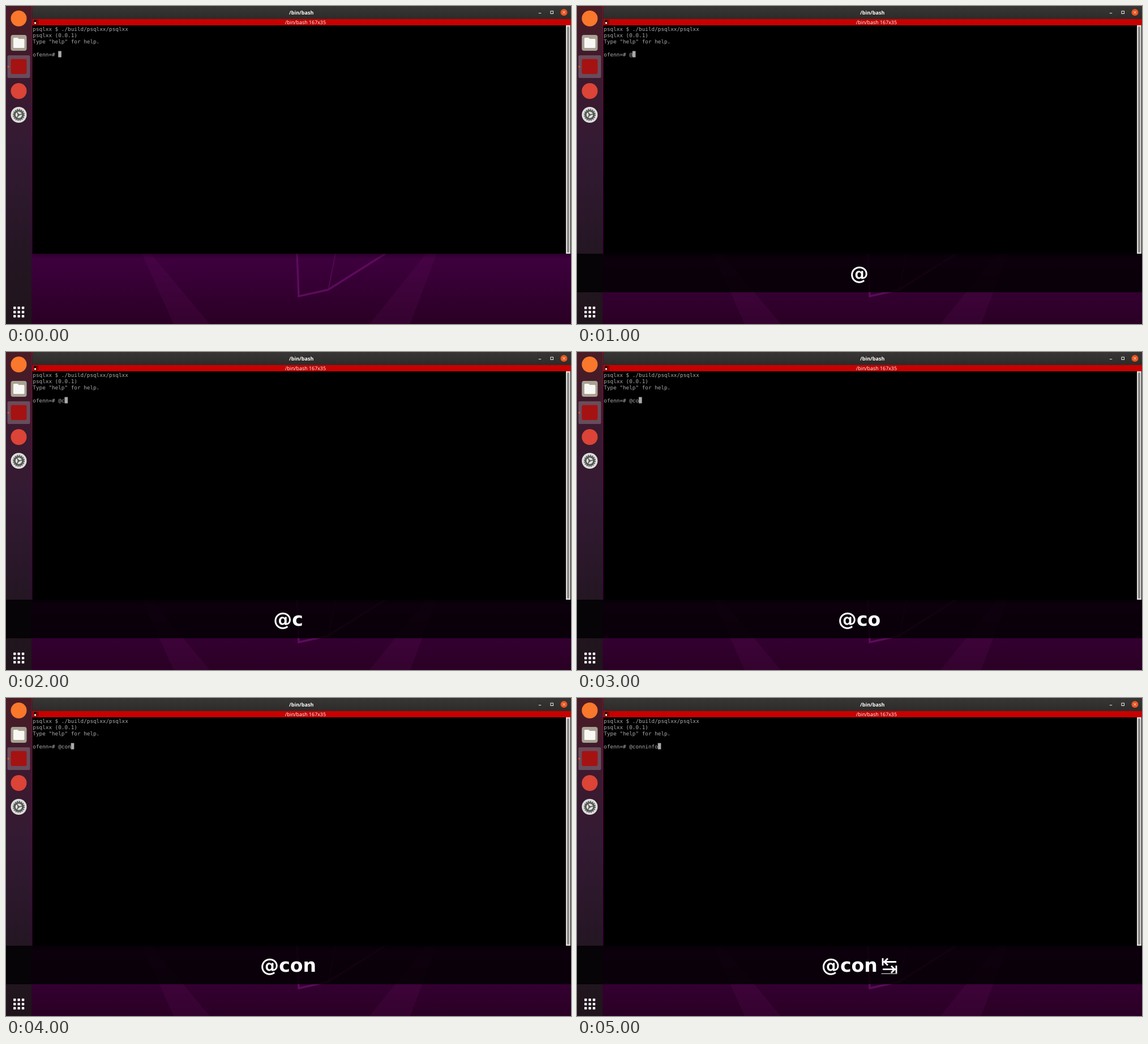
Animation, 998 px wide and 561 px high, one loop 6 s. Source, as an HTML page:

```html
<!DOCTYPE html>
<html lang="en">
<head>
<meta charset="utf-8">
<title>Terminal completion demo</title>
<style>
  html, body { margin: 0; width: 100%; height: 100%; overflow: hidden; background: #000; }
  svg { display: block; width: 998px; height: 561px; }
  text { text-rendering: geometricPrecision; white-space: pre; }
  .title { font: bold 9px "Open Sans", sans-serif; fill: #fff; text-anchor: middle; }
  .subtitle { font: 8.9px "Open Sans", sans-serif; fill: #fff; text-anchor: middle; }
  .term { font: 9.33px "DejaVu Sans Mono", monospace; fill: #aaa; }
  .keys { font: bold 33.1px "DejaVu Sans", sans-serif; fill: #fff; text-anchor: middle; }
  .cursor { fill: #aaa; }

  /* Each step owns one second of the six second loop. */
  .step {
    visibility: hidden;
    animation: step 6s step-end infinite;
    animation-delay: calc(var(--i) * 1s - 6s);
  }
  .band { animation: band 6s step-end infinite; }
  @keyframes step { 0% { visibility: visible; } 16.6667%, 100% { visibility: hidden; } }
  @keyframes band { 0% { visibility: hidden; } 16.6667%, 100% { visibility: visible; } }
</style>
</head>
<body>
<svg viewBox="0 0 998 561">
  <defs>
    <linearGradient id="wall" x2="0" y2="1">
      <stop offset="0" stop-color="#7c1630"/>
      <stop offset=".4" stop-color="#580a44"/>
      <stop offset=".78" stop-color="#3f0040"/>
      <stop offset="1" stop-color="#2a0024"/>
    </linearGradient>
    <linearGradient id="dock" x2="0" y2="1">
      <stop offset="0" stop-color="#4a1c25"/>
      <stop offset=".2" stop-color="#3d1a2e"/>
      <stop offset=".45" stop-color="#331a33"/>
      <stop offset=".78" stop-color="#241623"/>
      <stop offset="1" stop-color="#1f141b"/>
    </linearGradient>
    <linearGradient id="bar" x2="0" y2="1">
      <stop offset="0" stop-color="#383735"/>
      <stop offset="1" stop-color="#2c2b29"/>
    </linearGradient>
    <linearGradient id="shadow" x2="0" y2="1">
      <stop offset="0" stop-opacity=".35"/>
      <stop offset="1" stop-opacity="0"/>
    </linearGradient>
  </defs>

  <!-- wallpaper -->
  <rect width="998" height="561" fill="url(#wall)"/>
  <g fill="#7a1a78" fill-opacity=".13">
    <path d="M240 437L296 561H360L256 437Z"/>
    <path d="M761 437L714 561H642L742 437Z"/>
  </g>
  <g fill="none" stroke="#5c0b5b">
    <path d="M514 437L517 512L569 500.500L670 437" stroke-width="3.500"/>
    <path d="M582 437L569.500 500" stroke-width="1.300"/>
  </g>
  <rect x="46" y="437" width="952" height="9" fill="url(#shadow)"/>

  <!-- dock -->
  <rect width="45" height="561" fill="url(#dock)"/>
  <circle cx="22.500" cy="22" r="14" fill="#f9782c"/>
  <rect x="8.500" y="51" width="28" height="28" rx="4" fill="#a8a293"/>
  <path d="M13 57.500q0-1.500 1.500-1.500h6l2 2h8.500q1.500 0 1.500 1.500v13q0 1.500-1.500 1.500h-16.500q-1.500 0-1.500-1.500Z" fill="#f8f7f4"/>
  <rect x="2.500" y="87" width="40" height="40" rx="2.500" fill="#fff" fill-opacity=".22"/>
  <circle cx="4" cy="107" r="1.500" fill="#e95420"/>
  <rect x="8.500" y="93.500" width="28" height="26.500" rx="3" fill="#a51212"/>
  <circle cx="22.500" cy="150" r="14" fill="#db4437"/>
  <g transform="translate(22.500 192)">
    <circle r="14" fill="#dededb"/>
    <circle r="9.500" fill="none" stroke="#555955" stroke-width="2" stroke-dasharray="2.200 1.530"/>
    <circle r="7.300" fill="none" stroke="#555955" stroke-width="3"/>
    <path d="M0 0L7-1.500M0 0L-4-6M0 0L-4 6" stroke="#555955" stroke-width="1.500"/>
    <path d="M-2-3L3 0L-2 3Z" fill="#555955"/>
  </g>
  <path d="M15.500 532.500h15M15.500 540h15M15.500 547.300h15" stroke="#f4f2f3" stroke-width="4.500"
        stroke-dasharray="4.500 2.900" transform="translate(-2.500 0)" pathLength="15" visibility="hidden"/>
  <g id="apps" fill="#f4f2f3"></g>

  <!-- window -->
  <path d="M46.500 437V5q0-5 5-5H993q5 0 5 5V437Z" fill="#000"/>
  <path d="M46.500 23V5q0-5 5-5H993q5 0 5 5V23Z" fill="url(#bar)"/>
  <rect x="46.500" y="23" width="951.500" height="11" fill="#c80000"/>
  <text class="title" x="521.700" y="15">/bin/bash</text>
  <text class="subtitle" x="529" y="31.700">/bin/bash 167x35</text>
  <rect x="49" y="24.700" width="8" height="7.600" fill="#200"/>
  <path d="M50 28.500h3v3h-3Z" fill="#fff"/>
  <path d="M53.700 25.500h2.600v2.600h-2.600ZM53.700 29h2.600v2.500h-2.600Z" fill="#d00"/>
  <g fill="none" stroke="#eee">
    <path d="M940.800 12.700h4.400"/>
    <rect x="962" y="9" width="4.500" height="4.500"/>
    <circle cx="985.500" cy="11.300" r="6" fill="#e95420" stroke="none"/>
    <path d="M983.400 9.200l4.200 4.200m0-4.200l-4.200 4.200"/>
  </g>
  <rect x="989" y="34" width="8" height="403" fill="#dcdad8"/>
  <rect x="991" y="36" width="4" height="399" rx="2" fill="#8f8d8b"/>

  <!-- terminal -->
  <g class="term">
    <text x="47.300" y="43.700">psqlxx $ ./build/psqlxx/psqlxx</text>
    <text x="47.300" y="54.900">psqlxx (0.0.1)</text>
    <text x="47.300" y="66.100">Type "help" for help.</text>
    <text x="47.300" y="88.500">ofenn=# </text>
  </g>

  <rect class="band" y="437" width="998" height="68" fill="#000" fill-opacity=".82"/>
  <g id="steps"></g>
</svg>
<script>
  const CELL = 5.617, PROMPT_END = 47.3 + 8 * CELL;
  const typed = ["", "@", "@c", "@co", "@con", "@conninfo"];
  const tabKey = `<path d="M540 459v13M541.500 465.500H564M564 472v13.500M540 478.700H563"
      fill="none" stroke="#fff" stroke-width="2.800"/>
    <path d="M549 459.500l-6 6 6 6M555 472.700l6 6-6 6" fill="none" stroke="#fff" stroke-width="3"/>
    <path d="M537.500 486.300h28" stroke="#fff" stroke-width="1"/>`;

  const stepMarkup = (text, i) => {
    const completed = text.length > 4;
    return `<g class="step" style="--i:${i}">
      <text class="term" x="${PROMPT_END}" y="88.500">${text}</text>
      <rect class="cursor" x="${PROMPT_END + text.length * CELL}" y="79.500" width="5.600" height="11"/>
      <text class="keys" x="${completed ? 481.3 : 498.6}" y="482.700">${text.slice(0, 4)}</text>
      ${completed ? tabKey : ""}
    </g>`;
  };
  document.getElementById("steps").innerHTML = typed.map(stepMarkup).join("");

  const appDot = (_, i) =>
    `<rect x="${13 + i % 3 * 7.4}" y="${530.3 + Math.floor(i / 3) * 7.4}" width="4.500" height="4.500" rx="1"/>`;
  document.getElementById("apps").innerHTML = Array.from({ length: 9 }, appDot).join("");
</script>
</body>
</html>
```
